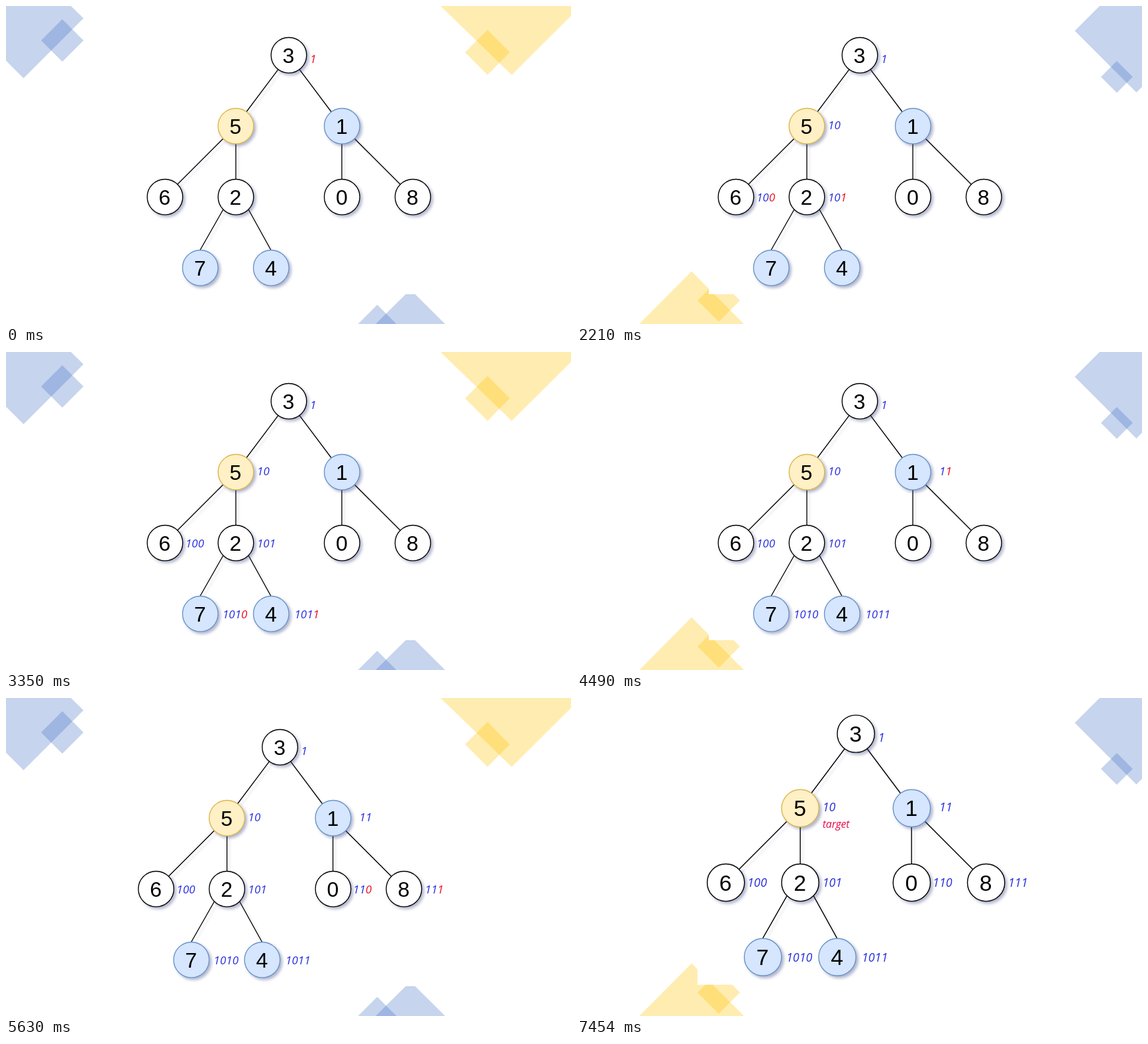
An HTML page for the animation above (7910 ms loop, 853 px wide and 480 px high).

```html
<!DOCTYPE html>
<html lang="en">
<head>
<meta charset="utf-8">
<title>Binary tree path labels</title>
<style>
  html, body { margin: 0; width: 100%; height: 100%; overflow: hidden; background: #fff; }
  svg { display: block; width: 100vw; height: 100vh; }

  .blue { fill: #4472c4; fill-opacity: .3; }
  .gold { fill: #ffc000; fill-opacity: .31; }

  .edges { stroke: #000; stroke-width: 1.35; }
  .shadow { filter: drop-shadow(3px 3.4px 2px rgba(61, 69, 130, .4)); }
  .nodes circle { r: 26.8px; fill: #fff; stroke: #000; stroke-width: 1.35; }
  .nodes .pick { fill: #fff0c5; stroke: #deb84c; }
  .nodes .leaf { fill: #d5e6fe; stroke: #6b94ca; }
  .keys { font: 32px "Liberation Sans", Arial, sans-serif; text-anchor: middle; }
  .paths { font: italic 17px "Open Sans", "Noto Sans", sans-serif; fill: #2a30df; }
  .paths .note { font-size: 15px; fill: #ec0b4a; }

  /* Seven slides: every animation shares one clock and jumps at slide edges. */
  .tree, .odd, .even, .paths text, .paths tspan {
    animation: 7910ms step-end infinite;
  }
  .tree { animation-name: tree; }
  .odd { animation-name: odd; }
  .even { animation-name: even; }
  .s1 { animation-name: show1 !important; }
  .s2 { animation-name: show2 !important; }
  .s3 { animation-name: show3 !important; }
  .s4 { animation-name: show4 !important; }
  .s5 { animation-name: show5 !important; }
  .s6 { animation-name: show6 !important; }
  .s0 tspan { animation-name: new0; }
  .s1 tspan { animation-name: new1; }
  .s2 tspan { animation-name: new2; }
  .s3 tspan { animation-name: new3; }
  .s4 tspan { animation-name: new4; }
  .s5 tspan { animation-name: new5; }

  @keyframes tree {
    0% { transform: matrix(1, 0, 0, 1, 0, 0); }
    71.1757% { transform: matrix(1, 0, 0, 1, -13.4, 0); }
    85.5879% { transform: matrix(1.05, 0, 0, 1.05, -27.3, -24); }
  }
  @keyframes odd {
    0%, 42.3515%, 71.1757% { visibility: visible; }
    27.9393%, 56.7636%, 85.5879% { visibility: hidden; }
  }
  @keyframes even {
    0%, 42.3515%, 71.1757% { visibility: hidden; }
    27.9393%, 56.7636%, 85.5879% { visibility: visible; }
  }

  @keyframes show1 { 0% { visibility: hidden; } 13.5272% { visibility: visible; } }
  @keyframes show2 { 0% { visibility: hidden; } 27.9393% { visibility: visible; } }
  @keyframes show3 { 0% { visibility: hidden; } 42.3515% { visibility: visible; } }
  @keyframes show4 { 0% { visibility: hidden; } 56.7636% { visibility: visible; } }
  @keyframes show5 { 0% { visibility: hidden; } 71.1757% { visibility: visible; } }
  @keyframes show6 { 0% { visibility: hidden; } 85.5879% { visibility: visible; } }

  /* The last digit stays red for the slide on which its label appears. */
  @keyframes new0 { 0% { fill: #ee1020; } 13.5272% { fill: #2a30df; } }
  @keyframes new1 { 0% { fill: #ee1020; } 27.9393% { fill: #2a30df; } }
  @keyframes new2 { 0% { fill: #ee1020; } 42.3515% { fill: #2a30df; } }
  @keyframes new3 { 0% { fill: #ee1020; } 56.7636% { fill: #2a30df; } }
  @keyframes new4 { 0% { fill: #ee1020; } 71.1757% { fill: #2a30df; } }
  @keyframes new5 { 0% { fill: #ee1020; } 85.5879% { fill: #2a30df; } }
</style>
</head>
<body>
<svg viewBox="0 0 853 480" preserveAspectRatio="none">
  <g class="odd">
    <g class="blue">
      <path d="M0 0H98L117 18.5 26.5 109 0 82.500Z"/>
      <path d="M85 20l32 32-32 32-32-32Z"/>
      <path d="M610.500 428l52.500 52h-105Z"/>
      <path d="M560.500 451l29 29h-58Z"/>
    </g>
    <g class="gold">
      <path d="M656 0H853V15L763.500 104Z"/>
      <path d="M727 36l33.500 34-33.500 34-34-34Z"/>
    </g>
  </g>

  <g class="even">
    <g class="blue">
      <path d="M789 0H853V122L844.500 130.500 751.500 37.500Z"/>
      <path d="M815 83l24 24-24 24-24-24Z"/>
    </g>
    <g class="gold">
      <path d="M173 400.500l79 79.500H94Z"/>
      <path d="M214 412.500l32 32-32 32-32-32Z"/>
    </g>
  </g>

  <g class="tree">
    <rect x="199" y="22" width="452" height="413" fill="#fff"/>

    <path class="edges" style="filter: drop-shadow(4px 4px 1.500px rgba(61, 69, 130, .15))" fill="none"
      d="M427 74.300L347 181 240 288M347 181V288M427 74.300L507 181 614 288M507 181V288M328 307L293 368.500M366 307L400 368.500"/>

    <g class="nodes shadow">
      <circle cx="427" cy="74.300"/>
      <circle cx="347" cy="181.300" class="pick"/>
      <circle cx="507.300" cy="181.300" class="leaf"/>
      <circle cx="240" cy="288.300"/>
      <circle cx="347" cy="288.300"/>
      <circle cx="507.300" cy="288.300"/>
      <circle cx="614.200" cy="288.300"/>
      <circle cx="293.300" cy="395.300" class="leaf"/>
      <circle cx="400.300" cy="395.300" class="leaf"/>
    </g>

    <g class="keys">
      <text x="426.500" y="85.700">3</text>
      <text x="346.500" y="192.700">5</text>
      <text x="506.800" y="192.700">1</text>
      <text x="239.500" y="299.700">6</text>
      <text x="346.500" y="299.700">2</text>
      <text x="506.800" y="299.700">0</text>
      <text x="613.700" y="299.700">8</text>
      <text x="292.800" y="406.700">7</text>
      <text x="399.800" y="406.700">4</text>
    </g>

    <g class="paths">
      <text class="s0" x="459" y="85.500"><tspan>1</tspan></text>
      <text class="s1" x="379" y="185.500">1<tspan>0</tspan></text>
      <text class="s2" x="271" y="294.500">10<tspan>0</tspan></text>
      <text class="s2" x="379" y="294.500">10<tspan>1</tspan></text>
      <text class="s3" x="327" y="401.500">101<tspan>0</tspan></text>
      <text class="s3" x="435.500" y="401.500">101<tspan>1</tspan></text>
      <text class="s4" x="547" y="185.500">1<tspan>1</tspan></text>
      <text class="s5" x="537.500" y="294.500">11<tspan>0</tspan></text>
      <text class="s5" x="646" y="294.500">11<tspan>1</tspan></text>
      <text class="s6 note" x="379" y="209.500">target</text>
    </g>
  </g>
</svg>
</body>
</html>
```
